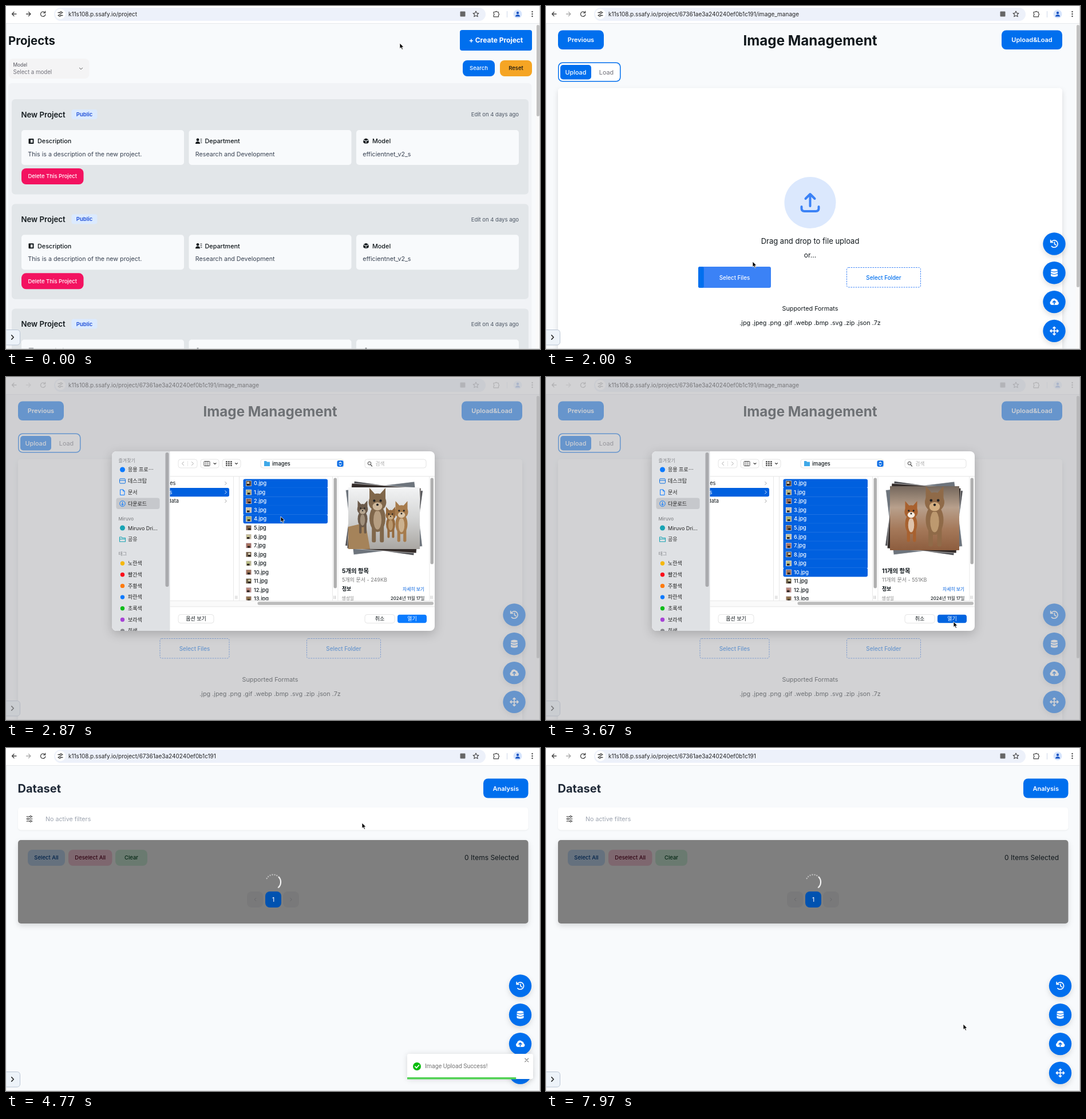
Recreate the animation shown at these times as an HTML page. Size 933 by 600 pixels, loop 8000 ms.

```html
<!DOCTYPE html>
<html lang="en">
<head>
<meta charset="utf-8">
<title>Image upload walkthrough</title>
<style>
  html, body { margin: 0; width: 100%; height: 100%; overflow: hidden; background: #f8fafc; }
  svg { display: block; width: 100vw; height: 100vh; }
  text { font-family: Inter, "Noto Sans CJK KR", "Noto Sans CJK", sans-serif; white-space: pre; }
  .toast text { font-family: Roboto, sans-serif; }
  .soft { filter: drop-shadow(0 1px 1px rgba(0,0,0,.06)); }
  .lift { filter: drop-shadow(0 4px 5px rgba(0,0,0,.13)); }
  .float { filter: drop-shadow(0 5px 9px rgba(0,0,0,.2)); }
</style>
</head>
<body>
<svg id="stage" viewBox="0 0 933 600"></svg>
<script>
const BLUE = '#006fee', INK = '#11181c', GRAY = '#71717a';

// Markup helpers; text is placed by the middle of its capitals.
const rect = (x, y, w, h, fill, r = 0, more = '') =>
  `<rect x="${x}" y="${y}" width="${w}" height="${h}" rx="${r}" fill="${fill}" ${more}/>`;
const circle = (x, y, r, fill, more = '') => `<circle cx="${x}" cy="${y}" r="${r}" fill="${fill}" ${more}/>`;
const text = (x, y, str, size, fill = INK, weight = 400, anchor = 'start') =>
  `<text x="${x}" y="${y + size * .364}" font-size="${size}" fill="${fill}" font-weight="${weight}" text-anchor="${anchor}">${str}</text>`;
const line = (d, color = '#444', w = 1.3, more = '') =>
  `<path d="${d}" fill="none" stroke="${color}" stroke-width="${w}" stroke-linecap="round" stroke-linejoin="round" ${more}/>`;
const shape = (d, fill, more = '') => `<path d="${d}" fill="${fill}" ${more}/>`;
const group = (attrs, ...parts) => `<g ${attrs}>${parts.join('')}</g>`;
const at = (x, y, ...parts) => group(`transform="translate(${x} ${y})"`, ...parts);
const button = (x, y, w, h, label, fill = BLUE, color = '#fff', size = 9.5, weight = 500, r = 8) =>
  rect(x, y, w, h, fill, r) + text(x + w / 2, y + h / 2, label, size, color, weight, 'middle');
const chevron = (x, y, s, dir, color, w) =>
  line(`M${-s / 2} ${-s}L${s / 2} 0L${-s / 2} ${s}`, color, w, `transform="translate(${x} ${y}) rotate(${dir})"`);
const repeat = (n, fn) => Array.from({ length: n }, (_, i) => fn(i)).join('');

function browserBar() {
  const icons = group('id="barIcons"',
    line('M18 14H10.5M14 10.5L10.5 14L14 17.5'),
    line('M35.5 14H43M39.5 10.5L43 14L39.5 17.5', '#444', 1.3, 'id="forward"'),
    line('M68 11.6A4.2 4.2 0 1 0 68.8 15M68.6 9.2V12.2H65.6'),
    line('M91 11.5H94M98 11.5H99M91 16.5H92M96 16.5H99'),
    circle(96, 11.5, 1.6, 'none', 'stroke="#444" stroke-width="1.2"'),
    circle(94, 16.5, 1.6, 'none', 'stroke="#444" stroke-width="1.2"'),
    rect(793.5, 9.5, 9, 9, '#666', 1),
    line('M821 9L822.5 12.4L826 12.7L823.4 15L824.2 18.6L821 16.7L817.8 18.6L818.6 15L816 12.7L819.5 12.4Z', '#444', 1.1),
    line('M852 10.5H855A1.6 1.6 0 0 1 858 10.5H860.5V13A1.6 1.6 0 0 1 860.5 16V18.8H852V16A1.6 1.6 0 0 0 852 13Z', '#444', 1.2),
    rect(875, 9, 1, 11, '#cfd8ea'),
    circle(894, 14, 7.5, '#d6e4fc'), circle(894, 12, 2.2, '#1a56c4'), shape('M890 18.5Q890 15 894 15T898 18.5Z', '#1a56c4'),
    repeat(3, i => circle(919.5, 10 + i * 4, 1.2, '#444')));
  return rect(0, 0, 933, 30, '#fff') + rect(84, 3, 754, 23, '#edf1fa', 11.5) + circle(95, 14, 9, '#fff')
    + icons + `<g id="url"></g>` + rect(0, 30, 933, 1, '#e6e8ec');
}

const scrollbar = h => rect(925, 31, 8, 569, '#fafafa') + rect(927, 33, 5, h, '#c1c1c1', 2.5);

function projectCard(i) {
  const column = (x, icon, title, value) =>
    rect(x, 217, 284, 61, '#f8fafc', 5) + icon + text(x + 28, 236.5, title, 10.8, INK, 500) + text(x + 11.3, 259, value, 10.7, '#374151');
  return at(0, i * 183.3,
    rect(10, 163, 903, 166.5, '#e2e6e9', 6),
    text(26.5, 190, 'New Project', 13.2, INK, 600),
    button(114.5, 181, 45, 17, 'Public', '#dbeafe', '#1d4ed8', 9.5, 600, 4),
    text(896, 190, 'Edit on 4 days ago', 9.5, '#4b5563', 400, 'end'),
    column(27, rect(39.5, 232, 9, 9, INK, 1) + rect(43, 234, 3.5, 5, '#fff'), 'Description', 'This is a description of the new project.'),
    column(319.5, circle(335, 234, 2.4, INK) + shape('M331 241Q331 237 335 237T339 241Z', INK) + line('M340 233H342M340 236H342M340.5 239H342', INK, 1), 'Department', 'Research and Development'),
    column(612, shape('M629 231.5L633.5 233.6L629 235.8L624.5 233.6ZM624.3 234.8L628.5 236.8V241.2L624.3 239ZM633.7 234.8L629.5 236.8V241.2L633.7 239Z', INK), 'Model', 'efficientnet_v2_s'),
    button(27, 284, 108.5, 28, 'Delete This Project', '#f31260'));
}

const projectsPage = () => group('id="projects"',
  rect(4, 135, 914.5, 480, '#f1f3f6', 6),
  text(4, 60.5, 'Projects', 20.4, INK, 700),
  button(793, 42, 126, 36, '+ Create Project', BLUE, '#fff', 12, 700, 4),
  rect(4.5, 92, 141, 35, '#f4f4f5', 8),
  text(12.5, 103, 'Model', 8.4, '#52525b'), text(12.5, 115, 'Select a model', 9.7, GRAY),
  chevron(131, 109.5, 2.6, 90, '#555', 1),
  button(798, 95, 56, 28, 'Search'), button(863, 95, 56, 28, 'Reset', '#f5a524', '#111'),
  repeat(3, projectCard), scrollbar(160));

const datasetPage = () => group('id="dataset"',
  text(20.5, 71, 'Dataset', 20, '#1f2937', 700),
  button(834, 53.5, 78.5, 34, 'Analysis', BLUE, '#fff', 11, 600),
  rect(21, 104, 891.5, 39.5, '#fff', 5, 'class="soft"'),
  line('M36 120H46M36 124H46M36 128H46', '#333', 1.1),
  circle(43, 120, 1.5, '#fff', 'stroke="#333"'), circle(38.5, 124, 1.5, '#fff', 'stroke="#333"'), circle(43, 128, 1.5, '#fff', 'stroke="#333"'),
  text(69, 124.5, 'No active filters', 10.7, '#9ca3af'),
  rect(21, 161, 891.5, 146, '#fff', 5, 'class="lift"'),
  button(38, 178, 65, 28, 'Select All', '#cce3fd', '#004493'),
  button(109, 178, 76.5, 28, 'Deselect All', '#fdd0df', '#610726'),
  button(191, 178, 56, 28, 'Clear', '#d6f5e2', '#095028'),
  rect(421, 251, 28, 28, '#f4f4f5', 8), rect(484, 251, 28, 28, '#f4f4f5', 8),
  chevron(435.5, 265, 2.6, 180, '#d0d0d6', 1), chevron(498, 265, 2.6, 0, '#d0d0d6', 1),
  group('id="loading"', rect(21, 161, 891.5, 146, 'rgba(0,0,0,.5)', 5),
    at(467, 234.5, line('M9.2 9.2A13 13 0 0 1 -9.2 9.2', '#fff', 2, 'id="solidArc"'),
      line('M9.2 9.2A13 13 0 0 1 -9.2 9.2', '#fff', 2, 'id="dottedArc" stroke-dasharray="0 4.05" opacity=".75"'))),
  group('id="current"', rect(453, 251, 28, 28, 'currentColor', 8)),
  text(467, 265, '1', 9.8, '#fff', 500, 'middle'),
  text(896, 192, '0 Items Selected', 12, INK, 400, 'end'));

function managePage() {
  const dashed = (x, w, label) =>
    rect(x, 457.5, w, 34.5, '#fff', 3, 'stroke="#3b82f6" stroke-dasharray="2.6 1.6"') + text(x + w / 2, 475, label, 9.8, BLUE, 500, 'middle');
  return group('id="manage"',
    button(21, 42.5, 80, 33.5, 'Previous', BLUE, '#fff', 11, 600),
    text(461.5, 60, 'Image Management', 24.2, INK, 700, 'middle'),
    button(796, 42.5, 106, 33.5, 'Upload&amp;Load', BLUE, '#fff', 11, 600),
    rect(21.8, 99.3, 108, 32.5, '#fff', 7, `stroke="${BLUE}" stroke-width="1.5"`),
    button(25, 103, 54, 25.5, 'Upload', BLUE, '#fff', 10.8, 500, 5), text(105.5, 116, 'Load', 10.8, GRAY, 400, 'middle'),
    rect(21, 143.5, 881, 480, '#fff', 5, 'class="lift"'),
    circle(461.5, 344, 45, '#dbe8fd'),
    line('M461.5 350V330M453.5 337L461.5 329L469.5 337M446.5 351V354Q446.5 359 451.5 359H471.5Q476.5 359 476.5 354V351', '#3b82f6', 4),
    text(461.5, 411, 'Drag and drop to file upload', 13, INK, 400, 'middle'),
    text(461.5, 436, 'or...', 12, INK, 400, 'middle'),
    dashed(269, 121, 'Select Files'), dashed(525.5, 129, 'Select Folder'),
    group('id="hover"', rect(266, 456, 127, 37, '#3b82f6', 3), rect(266, 456, 0, 37, BLUE, 3, 'id="sweep"'),
      text(329.5, 475, 'Select Files', 9.8, '#fff', 500, 'middle')),
    text(461.5, 529, 'Supported Formats', 10.8, INK, 400, 'middle'),
    text(461.5, 554.5, '.jpg .jpeg .png .gif .webp .bmp .svg .zip .json .7z', 10.8, INK, 400, 'middle'),
    scrollbar(459));
}

function floatingButtons() {
  const icons = [
    line('M-5.5 -3A6.2 6.2 0 1 1 -4.6 4.3M-6.3 -6.5V-2.6H-2.4M0.5 -3V0.6L3 2', '#fff', 1.7),
    shape('M-6 -4.6A6 2.4 0 0 1 6 -4.6V4.6A6 2.4 0 0 1 -6 4.6Z', '#fff') + line('M-6 -3.4Q0 0 6 -3.4M-6 1Q0 4.4 6 1', BLUE, 1.2),
    shape('M-4.5 5.5A4 4 0 0 1 -5.6 -1.8A5 5 0 0 1 3 -4.4A3.6 3.6 0 0 1 6 -0.8A3.3 3.3 0 0 1 5 5.5Z', '#fff') + line('M0 4V-1.5M-2.4 0.6L0 -1.8L2.4 0.6', BLUE, 1.7),
    line('M-7 0H7M0 -7V7M-5 -2L-7 0L-5 2M5 -2L7 0L5 2M-2 -5L0 -7L2 -5M-2 5L0 7L2 5', '#fff', 1.7)];
  return group('id="floating"', icons.map((icon, i) =>
    at(898.5, 416 + i * 50.8, group(`class="lift ${i < 3 ? 'extra' : ''}"`, circle(0, 0, 19.7, BLUE), icon))).join(''));
}

function pet(x, y, s, coat, face) {
  return group(`transform="translate(${x} ${y}) scale(${s})"`,
    rect(-7, 8, 5, 40, coat, 2), rect(3, 8, 5, 40, coat, 2),
    shape('M-10 -4L-10 -20L-2 -11ZM10 -4L10 -20L2 -11Z', coat),
    `<ellipse cy="18" rx="10" ry="17" fill="${coat}"/><ellipse cy="20" rx="5" ry="12" fill="${face}" opacity=".7"/>`,
    circle(0, -2, 11, coat), `<ellipse cy="3" rx="6" ry="5" fill="${face}"/>`,
    circle(-4, -4, 1.5, '#222'), circle(4, -4, 1.5, '#222'), circle(0, 1, 1.4, '#222'));
}

function preview() {
  const card = (angle, fill) => rect(600, 190, 121, 114, fill, 0, `transform="rotate(${angle} 660 247)" stroke="#fff" stroke-width=".6"`);
  return card(8, '#4b4c50') + card(-7, '#6d747c') + card(4, '#332c2a')
    + group('id="cats"', rect(598, 193, 125, 108, 'url(#pale)'), shape('M598 262L628 255L636 301H598Z', '#a5835a'),
      pet(623, 233, .85, '#6b5a4a', '#b5a590'), pet(672, 243, .8, '#94693d', '#c9ab82'),
      pet(691, 238, 1.05, '#a67b4c', '#dcc8ac'), pet(649, 222, 1.4, '#80674b', '#cdb699'))
    + group('id="dogs"', rect(601, 191, 121, 112, 'url(#dusk)'), pet(638, 238, 1.05, '#a8612f', '#f6ece0'), pet(679, 222, 1.55, '#8f6a48', '#d2ae80'));
}

const ROW = 15.53, FIRST_ROW = 178.4;

function fileRow(i) {
  const y = FIRST_ROW + ROW * i, hue = (i * 83 + 25) % 60;
  return group('class="file"', rect(414.5, y, 147.5, ROW + .2, '#0060df', i ? 0 : 3),
    line(`M434 ${y + ROW}H558`, '#2b79e6', .5),
    rect(419, y + 3, 10, 9.5, '#fff'), rect(419.5, y + 3.5, 9, 8.5, `hsl(${hue} 22% ${30 + i * 29 % 45}%)`),
    circle(423 + i % 3, y + 7, 2.1, `hsl(${hue + 15} 35% ${80 - i * 17 % 45}%)`), rect(421 + i % 3, y + 8.5, 4.5, 3, '#28221f'),
    text(433, y + 7.6, i + '.jpg', 9.2, 'currentColor', 500));
}

function sidebar() {
  const heading = (y, label) => text(196.5, y, label, 8, '#85878b', 500);
  const item = (y, label) => text(213, y, label, 9, '#222');
  const tags = ['노란색', '빨간색', '주황색', '파란색', '초록색', '보라색', '회색'];
  const colors = ['#f5b70b', '#fb0d1b', '#ff7a0a', '#0a7aff', '#0ebd1a', '#a742d6', '#85868a'];
  return rect(185, 130, 101.5, 314, '#dfe1e4') + rect(278.5, 132, 6, 235, '#a9aaad', 3) + rect(192.5, 211.5, 76, 19.5, '#c6c8cc', 4)
    + heading(146, '즐겨찾기') + item(162, '응용 프로⋯') + item(182, '데스크탑') + item(201.5, '문서') + item(221.5, '다운로드')
    + circle(203.5, 162, 4.5, '#0a7aff')
    + rect(198.5, 178, 10, 8, 'none', 1.5, 'stroke="#0a6ee0"') + line('M199 181H208', '#0a6ee0', 1.2)
    + line('M200 197H204.5L207 199.5V206.5H200ZM204.5 197V199.5H207', '#0a7aff', 1)
    + line('M203.5 219V224M201.5 222.2L203.5 224.2L205.5 222.2', '#0a7aff', 1) + circle(203.5, 221.5, 4.8, 'none', 'stroke="#0a7aff"')
    + heading(248.5, 'Miruvo') + item(264.5, 'Miruvo Dri...') + circle(203.5, 264, 4.5, '#18a4b4')
    + item(284, '공유') + line('M198.5 280H202L203 281.5H208.5V288H198.5ZM198.5 283.5H208.5', '#18a4b4', 1.1)
    + heading(309.5, '태그') + tags.map((tag, i) => circle(203.5, 326 + i * 19.7, 3.7, colors[i]) + item(326 + i * 19.7, tag)).join('');
}

function fileDialog() {
  const box = (x, y, w, label = '') => rect(x, y, w, 15, '#fff', 4, 'stroke="#ddd" stroke-width=".8"') + text(x + w / 2, y + 7.5, label, 9, INK, 500, 'middle');
  const grip = x => line(`M${x} 383V388M${x + 2.5} 383V388`, '#aaa', .7);
  return group('id="dialog" class="float"', group('clip-path="url(#dialogClip)"',
    rect(185, 130, 564, 314, '#fff'),
    rect(286.5, 173.5, 463, .8, '#ddd'),
    box(301, 144, 33), chevron(309, 151.5, 3, 180, '#aaa', 1), chevron(326, 151.5, 3, 0, '#aaa', 1), rect(317, 147, .7, 9, '#ddd'),
    box(340, 144, 32), rect(346, 147.5, 10, 8, 'none', 1, 'stroke="#444"'), line('M349.3 148V155M352.7 148V155', '#444', .9), chevron(365, 151.5, 2, 90, '#444', 1.1),
    box(378, 144, 32), repeat(9, i => rect(384 + i % 3 * 4, 147 + (i / 3 | 0) * 3.3, 2.8, 2.3, '#555')), chevron(402.5, 151.5, 2, 90, '#444', 1.1),
    box(445, 144, 145), shape('M451 147H455L456 148.5H461V156H451Z', '#3ea8e8'), text(465, 151.8, 'images', 9.2, INK, 500),
    rect(578.5, 146, 11, 11, '#0a6ee6', 3), line('M582 150.5L584 148.5L586 150.5M582 152.8L584 154.8L586 152.8', '#fff', 1.1),
    box(627, 144, 107), circle(635, 151, 2.8, 'none', 'stroke="#444"'), line('M637.2 153.4L639.5 156', '#444', 1.2), text(645.5, 152, '검색', 8.6, '#aaa'),
    rect(280, 194, 110, 15.3, '#0060df', 3),
    text(284, 186, 'ies', 9.2), text(285.5, 201.5, 's', 9.2, '#fff'), text(283, 217, 'data', 9.2),
    [186, 201.5, 217].map((y, i) => chevron(384, y, 2.6, 0, i === 1 ? '#fff' : '#999', .9)).join(''),
    rect(397, 174, .8, 217, '#e3e3e3'), rect(407, 174, .8, 217, '#e3e3e3'), rect(570, 174, .8, 217, '#e3e3e3'),
    rect(579.5, 174, .8, 217, '#e3e3e3'), rect(739.5, 174, .8, 217, '#e3e3e3'),
    grip(401), grip(573), grip(742),
    rect(572.5, 176.5, 5.5, 193, '#b0b0b0', 2.7), rect(741.5, 176.5, 5.5, 151, '#b0b0b0', 2.7),
    group('clip-path="url(#listClip)"', repeat(14, fileRow)),
    group('id="details"', preview(), '<g id="summary"></g>',
      text(587, 371, '정보', 8.8, INK, 700), text(731, 371.5, '자세히 보기', 7.8, '#0060df', 500, 'end'),
      text(586.5, 387, '생성일', 7.8, '#888'), text(731.5, 387, '2024년 11월 17일', 7.8, INK, 500, 'end')),
    rect(286.5, 391, 463, 10.5, '#fafafa'), rect(286.5, 391, 463, .7, '#e3e3e3'), rect(439.5, 393.2, 307.5, 5.5, '#bbb', 2.7), rect(286.5, 401.5, 463, .7, '#ddd'),
    box(301, 415.5, 62, '옵션 보기'), box(627, 415.5, 52, '취소'),
    group('id="open"', rect(684, 415.7, 51, 14.6, 'currentColor', 4)), text(709.5, 423, '열기', 9, '#fff', 500, 'middle'),
    sidebar()));
}

const toast = () => group('id="toast" class="toast"',
  rect(701, 535, 220, 44, '#fff', 3, 'style="filter:drop-shadow(0 1px 5px rgba(0,0,0,.14))"'),
  circle(718, 557, 7, '#07bc0c'), line('M714.8 557.2L717.2 559.6L721.5 554.8', '#fff', 1.7),
  text(732, 556, 'Image Upload Success!', 10.5, '#757575'),
  line('M906.7 543L912.7 549M912.7 543L906.7 549', '#888', 1.1), rect(701, 576, 220, 3.5, '#50d152', 0, 'id="progress"'));

const gradient = (id, ...colors) => `<linearGradient id="${id}" x2="0" y2="1">${colors.map((c, i) =>
  `<stop offset="${i / (colors.length - 1)}" stop-color="${c}"/>`).join('')}</linearGradient>`;

const stage = document.getElementById('stage');
stage.innerHTML = `<defs>${gradient('pale', '#f3f4f5', '#d3d4d4', '#a9a6a2')}${gradient('dusk', '#74675c', '#b8a08c', '#a5795a', '#8d5d3e')}
  <clipPath id="dialogClip">${rect(185, 130, 564, 314, '#000', 8)}</clipPath>
  <clipPath id="listClip">${rect(408, 174, 162, 216.5, '#000')}</clipPath></defs>`
  + rect(0, 0, 933, 600, '#f8fafc') + projectsPage() + datasetPage() + managePage() + floatingButtons()
  + rect(-4, 566.5, 28.5, 26.5, '#edf3f9', 5, 'stroke="#b9c5d4"') + chevron(11.5, 579.5, 3.6, 0, '#222', 1.5)
  + browserBar() + rect(932, 0, 1, 600, '#ccc') + rect(0, 599, 933, 1, '#d5d7d9') + rect(0, 30, .7, 570, '#e0e2e5')
  + rect(0, 0, 933, 600, 'rgba(178,178,181,.58)', 0, 'id="shade"') + fileDialog() + toast()
  + shape('M0 0V9.6L2.2 7.6L3.8 11.2L5.5 10.4L3.9 7H6.9Z', '#000', 'id="cursor" stroke="#fff" stroke-width=".8"');

const el = Object.fromEntries([...stage.querySelectorAll('[id]')].map(node => [node.id, node]));
const extras = stage.querySelectorAll('.extra'), files = stage.querySelectorAll('.file');
const show = (node, on) => { node.style.display = on ? '' : 'none'; };
const clamp = v => Math.max(0, Math.min(1, v));
const ease = v => (v = clamp(v)) * v * (3 - 2 * v);

const spin = (node, easing) => {
  const turn = node.animate([{ transform: 'rotate(0deg)' }, { transform: 'rotate(360deg)' }], { duration: 800, iterations: Infinity, easing });
  turn.pause();
  return turn;
};
const spins = [spin(el.solidArc, 'ease'), spin(el.dottedArc, 'linear')];

const PATH = [ // time, x, y
  [0, 688, 65], [380, 560, 190], [540, 560, 190], [870, 483, 93], [1150, 897, 566], [1300, 897, 566],
  [1450, 897, 516], [1600, 897, 516], [2000, 361, 447], [2150, 335, 470], [2350, 335, 470], [2620, 470, 184],
  [2870, 480, 244], [3180, 470, 340], [3650, 712, 428], [3780, 712, 428], [4200, 850, 58], [4380, 850, 58],
  [4770, 622, 131], [5300, 760, 16], [5850, 735, 75], [6640, 729, 483], [8000, 729, 483]];

function cursorAt(t) {
  const i = PATH.findIndex(key => key[0] > t), [t0, x0, y0] = PATH[i - 1], [t1, x1, y1] = PATH[i];
  const p = ease((t - t0) / (t1 - t0));
  return [x0 + (x1 - x0) * p, y0 + (y1 - y0) * p];
}

function draw(t) {
  const page = t < 500 ? 'projects' : t < 1580 || t >= 4440 ? 'dataset' : 'manage';
  ['projects', 'dataset', 'manage'].forEach(id => show(el[id], id === page));
  const base = 'k11s108.p.ssafy.io/project', id = '/67361ae3a240240ef0b1c191';
  el.url.innerHTML = text(109, 14, base + { projects: '', dataset: id, manage: id + '/image_manage' }[page], 10, '#222');
  el.forward.style.opacity = page === 'projects' ? 1 : .45;

  show(el.floating, page !== 'projects');
  el.floating.setAttribute('transform', `translate(${page === 'manage' ? -10.5 : 0} 0)`);
  const expand = ease((t - 1280) / 150);
  extras.forEach((node, i) => {
    node.style.opacity = expand;
    node.setAttribute('transform', `translate(0 ${(1 - expand) * (3 - i) * 20})`);
  });

  const hover = t < 2300 ? clamp((t - 1880) / 80) : 0;
  el.hover.style.opacity = hover;
  el.sweep.setAttribute('width', 127 * ease((t - 1950) / 300));

  const modal = t >= 2320 && t < 3800;
  show(el.shade, modal);
  show(el.dialog, modal);
  el.barIcons.style.opacity = modal ? .4 : 1;
  const [x, y] = cursorAt(t);
  const count = t < 2600 ? 0 : t > 3180 ? 11 : Math.max(1, Math.floor((y - FIRST_ROW) / ROW) + 1);
  files.forEach((row, i) => {
    row.style.color = i < count ? '#fff' : INK;
    show(row.children[0], i < count);
    show(row.children[1], i < count - 1);
    row.children[0].setAttribute('rx', i === 0 || i === count - 1 ? 3 : 0);
  });
  show(el.details, count > 0);
  show(el.cats, count < 9);
  show(el.dogs, count >= 9);
  el.summary.innerHTML = text(587, 339.5, count + '개의 항목', 10.4, INK, 700)
    + text(587, 354.5, `${count}개의 문서 - ${Math.round(50.33 * count - 2.67)}KB`, 9, '#777');
  el.open.style.color = !count ? '#b9d6fa' : t > 3600 ? '#0064e0' : '#0a7bff';

  const loading = t >= 4440;
  show(el.loading, loading);
  el.current.style.color = loading ? '#0052b0' : BLUE;
  spins.forEach(turn => { turn.currentTime = t - 4406 + 4000 * 2; });

  show(el.toast, t >= 4500 && t < 6650);
  el.toast.style.opacity = Math.min(clamp((t - 4500) / 120), clamp((6650 - t) / 150));
  el.progress.setAttribute('width', 220 * clamp(1 - (t - 4500) / 2000));

  el.cursor.setAttribute('transform', `translate(${x} ${y})`);
}

function frame() {
  draw(performance.now() % 8000);
  requestAnimationFrame(frame);
}
frame();
</script>
</body>
</html>
```
